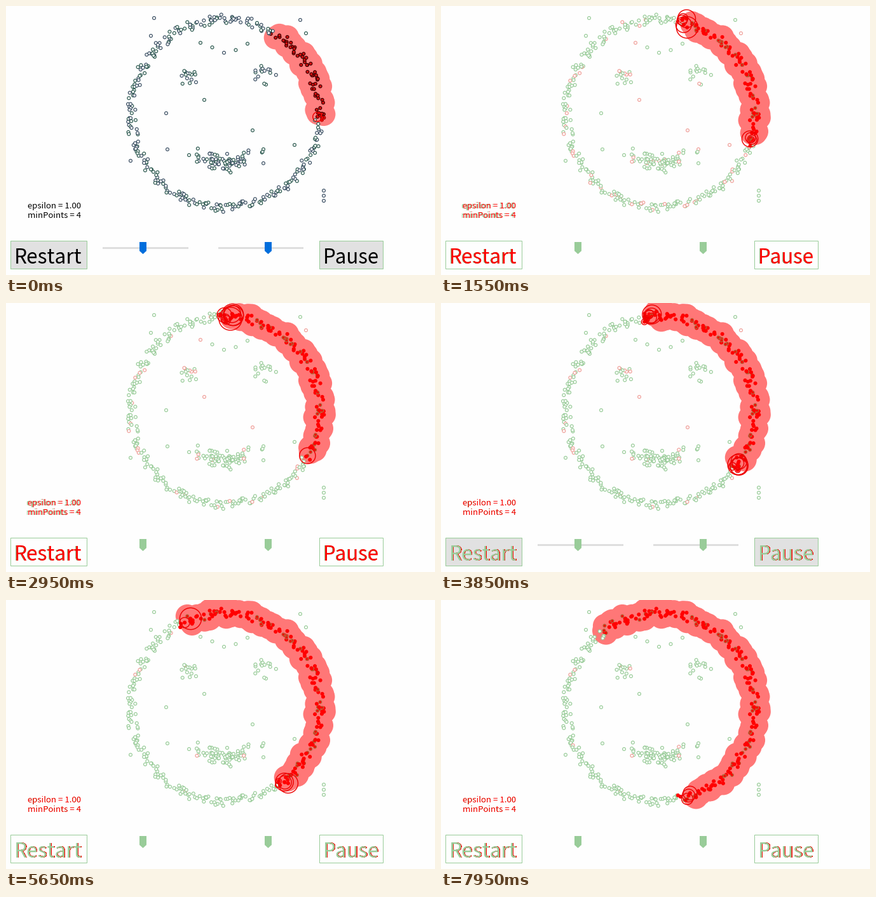
Animation of 675x424 px, one loop 8000 ms. Source, as a matplotlib script:

```python
import numpy as np
import matplotlib.pyplot as plt
from matplotlib.animation import FuncAnimation
from matplotlib.colors import to_rgba
from matplotlib.patches import Polygon, Rectangle

W, H, DPI = 675, 424, 100
PX = 72 / DPI                      # one pixel in points
FRAMES, STEP = 160, 50
CX, CY, RING, COUNT = 345, 169, 148.5, 350
GROW, REACH = 12, 18.5             # frames to full size, full radius
FONT = "Noto Sans CJK JP"

WHITE, GREEN, RED, PINK = "#fefefe", "#99cc99", "#ff0000", "#ff7777"
rng = np.random.default_rng(12)


def make_ring():
    """Jittered circle: angles in degrees and radii."""
    slot = 360 / COUNT
    angle = slot * np.arange(COUNT) - 180 + rng.normal(0, 1.8, COUNT)
    return angle, RING + np.clip(rng.normal(0, 4.2, COUNT), -7, 7)


def make_face():
    eyes = [rng.normal((x, 106), (9, 7), (15, 2)) for x in (289, 407)]
    x = np.clip(rng.normal(348, 29, 78), 285, 405)
    y = 246 - 0.0045 * (x - 347) ** 2 + np.clip(rng.normal(0, 7, 78), -13, 19)
    k = np.arange(5)
    brow = np.c_[306 + 18.5 * k, 66 + 8 * np.sin(k * 1.4 - 1.5)]
    column = [(500, 291 + 8 * i) for i in range(3)]
    strays = [(233, 19), (228, 47), (463, 22), (472, 43), (312, 148),
              (252, 169), (388, 196), (254, 226), (454, 219), (196, 244)]
    return np.vstack(eyes + [np.c_[x, y], brow, column, strays])


def start_times(angle):
    """Frame at which the spreading cluster reaches each ring angle."""
    climb = np.clip((angle - 57.5) / 72, 0, 1)
    up = 155 * (1 - (1 - climb) ** (1 / 1.2))
    down = (-1 - angle) * FRAMES / 73
    start = np.where(angle > 28, up, down) - GROW / 2
    start += rng.uniform(-5, 5, len(angle))
    start[(angle > -1) & (angle < 57.5)] = -2 * GROW
    start[(angle > 127) | (angle < -100)] = np.inf
    return start


angle, radius = make_ring()
theta = np.radians(angle)
face = make_face()
pts = np.vstack([np.c_[CX + radius * np.cos(theta), CY - radius * np.sin(theta)],
                 face])
start = np.r_[start_times(angle), np.full(len(face), np.inf)]
tint = rng.uniform(0, 1, len(pts))


def area(radius):
    return (2 * radius * PX) ** 2


fig = plt.figure(figsize=(W / DPI, H / DPI), dpi=DPI, facecolor=WHITE)
ax = fig.add_axes([0, 0, 1, 1])
ax.set_xlim(0, W)
ax.set_ylim(H, 0)
ax.axis("off")

discs = ax.scatter(*pts.T, s=0, c=PINK, linewidths=0, zorder=1)
dots = ax.scatter(*pts.T, s=area(2.4), linewidths=1.2 * PX, zorder=2)
rings = ax.scatter(*pts.T, s=0, facecolors="none", edgecolors="#ee0000",
                   linewidths=1.4 * PX, zorder=3)


def add_text(x, y, text, size):
    fringe, main = (ax.text(x, y, text, fontsize=size * PX, family=FONT,
                            weight="light", va="baseline", zorder=z)
                    for z in (5, 6))
    fringe.set_antialiased(False)
    return x, fringe, main


def add_button(x, width):
    return ax.add_patch(Rectangle((x + 0.5, 370.5), width, 44, lw=PX,
                                  ec=GREEN, zorder=4, snap=False))


def add_slider(left, right, knob):
    track = ax.add_patch(Rectangle((left, 380), right - left, 3, lw=0,
                                   fc="#dedede", zorder=4))
    shape = [(knob - 5.5, 372), (knob + 5.5, 372), (knob + 5.5, 386),
             (knob, 391), (knob - 5.5, 386)]
    return track, ax.add_patch(Polygon(shape, lw=0, zorder=5, snap=False))


buttons = [add_button(7, 120), add_button(493, 100)]
sliders = [add_slider(152, 287, 215.5), add_slider(334, 468, 412.5)]
titles = [add_text(13, 405.5, "Restart", 31.7),
          add_text(498.5, 405.5, "Pause", 31.2)]
labels = [add_text(33.5, 319, "epsilon = 1.00", 13.2),
          add_text(33.5, 333.5, "minPoints = 4", 13.2)]


def paint_text(items, main_color, fringe_color, shift):
    for x, fringe, main in items:
        main.set_color(main_color)
        fringe.set_color(fringe_color)
        fringe.set_x(x + shift)
        fringe.set_visible(shift != 0)


def paint_controls(n):
    first = n == 0
    panel = first or (n % 8 in (4, 5, 6) and n < 153)
    for box in buttons:
        box.set_facecolor("#e1e1e1" if panel else WHITE)
    for track, knob in sliders:
        track.set_visible(panel)
        knob.set_facecolor("#006edc" if first else GREEN)
    if first:
        paint_text(titles + labels, "black", "black", 0)
    else:
        late = n > 70
        paint_text(labels, RED, GREEN, 1 if late else -1)
        paint_text(titles, *((GREEN, RED, 1) if late else (RED, GREEN, -1)))


def pick(share, low, high):
    """Colour per dot: low for the given share, high for the rest."""
    return np.where((tint < share)[:, None], to_rgba(low), to_rgba(high))


def paint_dots(n):
    hit = (n >= start - 2)[:, None]
    if n == 0:
        fill, edge = "#d81010", pick(1, "#400000", RED)
        plain = pick(0.5, "#2d5a50", "#3c5064")
    else:
        fill, edge = RED, pick(0.25, "#b06a3c", RED)
        plain = pick(0.25 * abs(1 - n / 134), "#f0a09a", GREEN)
    dots.set_facecolors(np.where(hit, to_rgba(fill), to_rgba("white")))
    dots.set_edgecolors(np.where(hit, edge, plain))


def draw(n):
    age = n - start
    growing = (age > 0) & (age < GROW)
    size = REACH * np.clip(age / GROW, 0, 1)
    rings.set_sizes(np.where(growing, area(size), 0))
    rings.set_linewidths(np.where(growing, 1.4 * PX, 0))
    discs.set_sizes(np.where(age >= GROW, area(REACH), 0))
    discs.set_facecolor("#ff8080" if n == 0 else PINK)
    paint_dots(n)
    paint_controls(n)
    return []


anim = FuncAnimation(fig, draw, frames=FRAMES, interval=STEP, repeat=True,
                     repeat_delay=0, init_func=lambda: draw(0))
plt.show()
```
